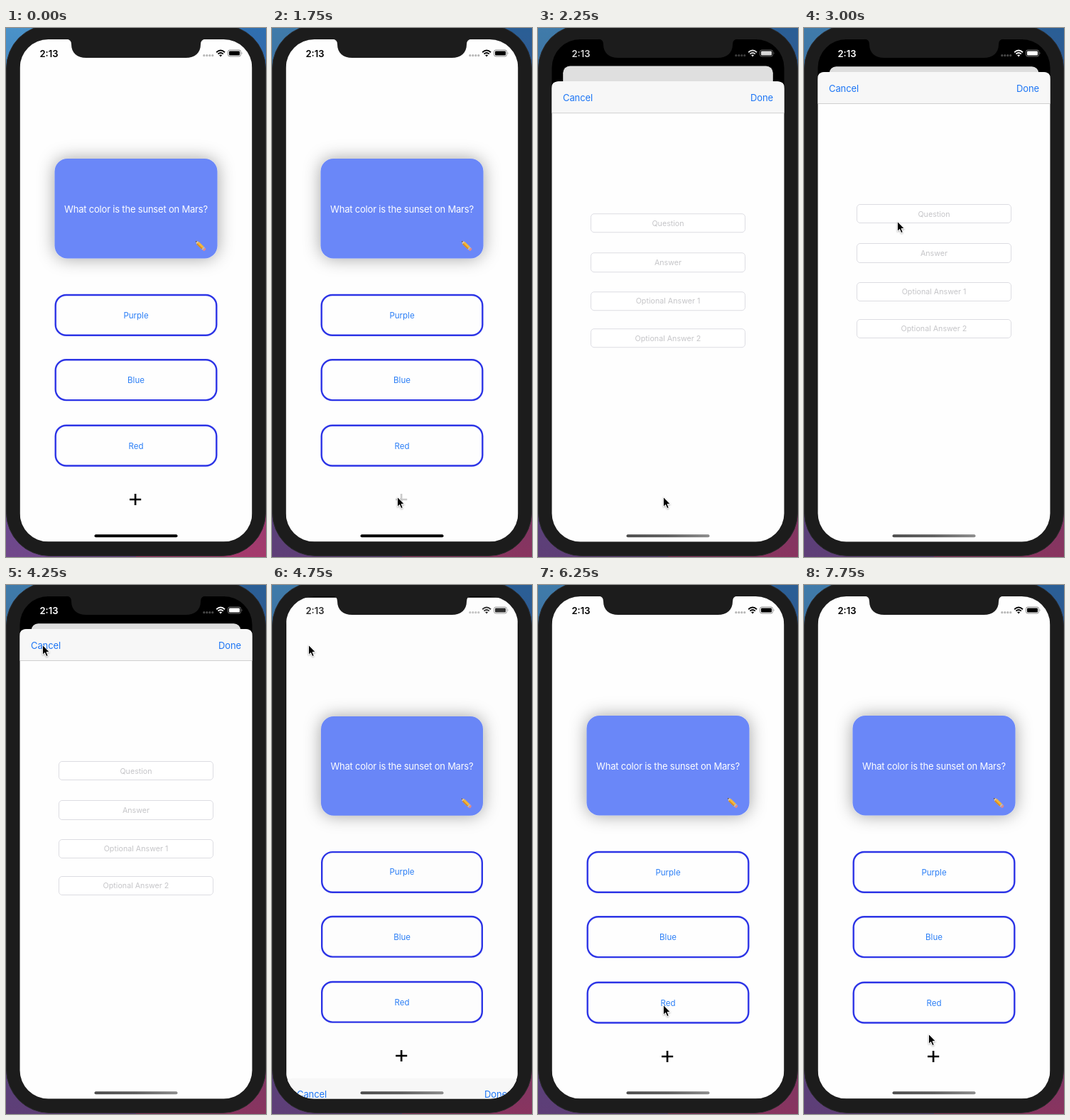
An HTML page that plays this animation: 366x745 px, repeating every 8000 ms.

```html
<!DOCTYPE html>
<html lang="en">
<head>
<meta charset="utf-8">
<title>Flashcards</title>
<style>
@property --p { syntax: "<number>"; inherits: true; initial-value: 0; }
html, body { margin: 0; height: 100%; overflow: hidden; background: #1c1c1c; }
svg { display: block; width: 366px; height: 745px; font-family: Inter, Roboto, sans-serif; }
text { dominant-baseline: central; }
.mid { text-anchor: middle; }

/* everything holds on a 250 ms beat */
.wall, .screen, .bar, .home, .add, .cursor { animation: 8s step-end infinite; }

.wall { animation-name: wall; }
.screen { animation-name: present; }
.bar { animation-name: bar; color: #000; }
.home { animation-name: home; }
.add { animation-name: press; }
.cursor { animation-name: cursor; }

/* --p: how far the sheet is presented */
.page {
  transform-origin: 183px 369.5px;
  transform: translateY(calc(3.5px * var(--p))) scale(calc(1 - .098 * var(--p)));
}
.dim { opacity: calc(.125 * var(--p)); }
.sheet { transform: translateY(calc(662px * (1 - var(--p)))); }

.question { font-size: 13px; letter-spacing: -.2px; fill: #fff; }
.choice rect { fill: none; stroke: #2d35e6; stroke-width: 2.4; }
.choice text { font-size: 11.5px; fill: #2c7ff6; }
.nav { font-size: 13px; letter-spacing: -.1px; fill: #1c75f5; }
.field rect { fill: #fff; stroke: #dcdce2; }
.field text { font-size: 10.7px; fill: #c5c5c8; }

@keyframes wall {
  0% { opacity: 1; }
  12.5%, 100% { opacity: .8; }
}
@keyframes present {
  0%, 100% { --p: 0; }
  25% { --p: .755; }
  28.125% { --p: .98; }
  31.25% { --p: 1; }
  56.25% { --p: .51; }
  59.375% { --p: .044; }
  62.5% { --p: 0; }
}
@keyframes bar {
  0%, 100% { color: #000; }
  25% { color: #5c5c5c; }
  28.125% { color: #d8d8d8; }
  31.25% { color: #fff; }
  56.25% { color: #8a8a8a; }
  59.375% { color: #303030; }
  62.5% { color: #000; }
}
@keyframes home {
  0% { fill: #000; }
  25%, 100% { fill: url(#homeFade); }
}
@keyframes press {
  0% { opacity: 1; }
  21.875% { opacity: .2; }
  25%, 100% { opacity: 1; }
}
@keyframes cursor {
  0% { opacity: 0; transform: translate(197px, 573px); }
  6.25% { opacity: 1; transform: translate(197px, 573px); }
  12.5% { transform: translate(193px, 602px); }
  15.625% { transform: translate(184px, 640px); }
  18.75% { transform: translate(177px, 657px); }
  21.875%, 28.125% { transform: translate(176px, 660px); }
  31.25% { transform: translate(165px, 560px); }
  34.375% { transform: translate(142px, 370px); }
  37.5% { transform: translate(131px, 272px); animation-timing-function: steps(3); }
  46.875% { transform: translate(70px, 115px); }
  50% { transform: translate(54px, 89px); }
  53.125%, 59.375% { transform: translate(51px, 84px); }
  62.5% { transform: translate(56px, 104px); }
  65.625% { transform: translate(88px, 230px); }
  68.75% { transform: translate(140px, 430px); }
  75% { transform: translate(169px, 556px); }
  78.125% { transform: translate(176px, 591px); animation-timing-function: steps(6); }
  96.875%, 100% { opacity: 1; transform: translate(175px, 632px); }
}
</style>
</head>
<body>
<svg viewBox="0 0 366 745">
  <defs>
    <linearGradient id="sky" x2="0" y2="1">
      <stop offset="0" stop-color="#4a92c9"/>
      <stop offset=".4" stop-color="#2f5fa0"/>
      <stop offset="1" stop-color="#71478a"/>
    </linearGradient>
    <linearGradient id="dusk" x2="0" y2="1">
      <stop offset="0" stop-color="#2f6fb0"/>
      <stop offset=".4" stop-color="#4a4f95"/>
      <stop offset="1" stop-color="#a53a6c"/>
    </linearGradient>
    <linearGradient id="homeFade">
      <stop offset="0" stop-color="#4c4c4c"/>
      <stop offset=".5" stop-color="#5e5e5e"/>
      <stop offset="1" stop-color="#8c8c8c"/>
    </linearGradient>
    <clipPath id="glass"><rect x="19.5" y="16" width="327" height="707.5" rx="40"/></clipPath>
    <filter id="glow" x="-25%" y="-40%" width="150%" height="180%">
      <feDropShadow dx="0" dy="0" stdDeviation="12" flood-color="#000" flood-opacity=".36"/>
    </filter>
    <filter id="soft" x="-50%" y="-50%" width="200%" height="200%">
      <feDropShadow dx="0" dy="1" stdDeviation="1" flood-color="#000" flood-opacity=".35"/>
    </filter>
  </defs>

  <rect width="366" height="745" fill="#1b2230"/>
  <g class="wall">
    <rect width="183" height="745" fill="url(#sky)"/>
    <rect x="183" width="183" height="745" fill="url(#dusk)"/>
  </g>
  <rect x=".5" y="-4" width="365" height="747.5" rx="61" fill="#1c1c1c" stroke="#2b2b2d"/>

  <g class="screen" clip-path="url(#glass)">
    <rect width="366" height="745"/>

    <g class="page">
      <rect x="19.5" y="16" width="327" height="707.5" rx="11" fill="#fefefe"/>
      <rect x="68.5" y="184" width="229" height="140.5" rx="18" fill="#6a87f8" filter="url(#glow)"/>
      <text class="question mid" x="183" y="254.5">What color is the sunset on Mars?</text>
      <g transform="translate(267 300) rotate(44)">
        <path d="M0 0 4-2.3V2.3Z" fill="#e8c79a"/>
        <path d="M0 0 1.7-1V1Z" fill="#333"/>
        <path d="M4-2.3H14V2.3H4Z" fill="#f3b73c"/>
        <path d="M4 .7H14V2.3H4Z" fill="#d68a24"/>
        <path d="M14-2.3H16V2.3H14Z" fill="#b9bcc2"/>
        <path d="M16-2.3H17Q18.6-2.3 18.6 0T17 2.3H16Z" fill="#e58a86"/>
      </g>
      <g class="choice mid">
        <rect x="69.7" y="376" width="226.6" height="56.8" rx="15"/>
        <text x="183" y="404.5">Purple</text>
        <rect x="69.7" y="467.3" width="226.6" height="56.8" rx="15"/>
        <text x="183" y="496">Blue</text>
        <rect x="69.7" y="559.7" width="226.6" height="56.8" rx="15"/>
        <text x="183" y="588.5">Red</text>
      </g>
      <path class="add" d="M174 664H190.2M182.1 656V672" stroke="#000" stroke-width="2.6"/>
    </g>

    <rect class="dim" width="366" height="745"/>

    <g class="bar" fill="currentColor">
      <text x="47.5" y="36" font-size="13" font-weight="600">2:13</text>
      <g opacity=".28">
        <circle cx="278.8" cy="38.7" r="1.6"/><circle cx="282.8" cy="38.7" r="1.6"/>
        <circle cx="286.8" cy="38.7" r="1.6"/><circle cx="290.8" cy="38.7" r="1.6"/>
      </g>
      <g fill="none" stroke="currentColor" stroke-width="1.9">
        <path d="M296.2 34.2Q302.1 29 308 34.2M298.4 36.6Q302.1 33.2 305.8 36.6"/>
      </g>
      <path d="M300.1 38.3Q302.1 36.6 304.1 38.3L302.1 40.4Z"/>
      <rect x="312.5" y="31" width="18" height="9" rx="2.6" fill="none" stroke="currentColor" stroke-opacity=".45"/>
      <rect x="314" y="32.4" width="15" height="6.2" rx="1.4"/>
      <path d="M331.8 33.8Q333.4 35.5 331.8 37.2Z" opacity=".5"/>
    </g>

    <g class="sheet">
      <path d="M19 745V72Q19 62 29 62H337Q347 62 347 72V745Z" fill="#fefefe"/>
      <path d="M19 106V72Q19 62 29 62H337Q347 62 347 72V106Z" fill="#f7f7f7"/>
      <path d="M19 106.5H347" stroke="#cfcfcf"/>
      <text class="nav" x="35" y="84.5">Cancel</text>
      <text class="nav" x="331" y="84.5" text-anchor="end">Done</text>
      <g class="field mid">
        <rect x="74.5" y="248.5" width="217" height="26" rx="4.5"/>
        <text x="183" y="262">Question</text>
        <rect x="74.5" y="303.5" width="217" height="27" rx="4.5"/>
        <text x="183" y="317.3">Answer</text>
        <rect x="74.5" y="358.5" width="217" height="26" rx="4.5"/>
        <text x="183" y="371.7">Optional Answer 1</text>
        <rect x="74.5" y="410.5" width="217" height="26" rx="4.5"/>
        <text x="183" y="423.8">Optional Answer 2</text>
      </g>
    </g>

    <rect class="home" x="124.5" y="713.2" width="117" height="4" rx="2"/>
  </g>

  <path d="M85 15.5Q92 16 92 23C92 35 100 42 113 42H253C266 42 274 35 274 23Q274 16 281 15.5Z" fill="#1c1c1c"/>

  <g class="cursor">
    <path d="M.5 .5V14.2L3.6 11.4 5.8 16.6 8.2 15.6 6 10.5H10.2Z" stroke="#fff" stroke-width=".9" filter="url(#soft)"/>
  </g>
</svg>
</body>
</html>
```
